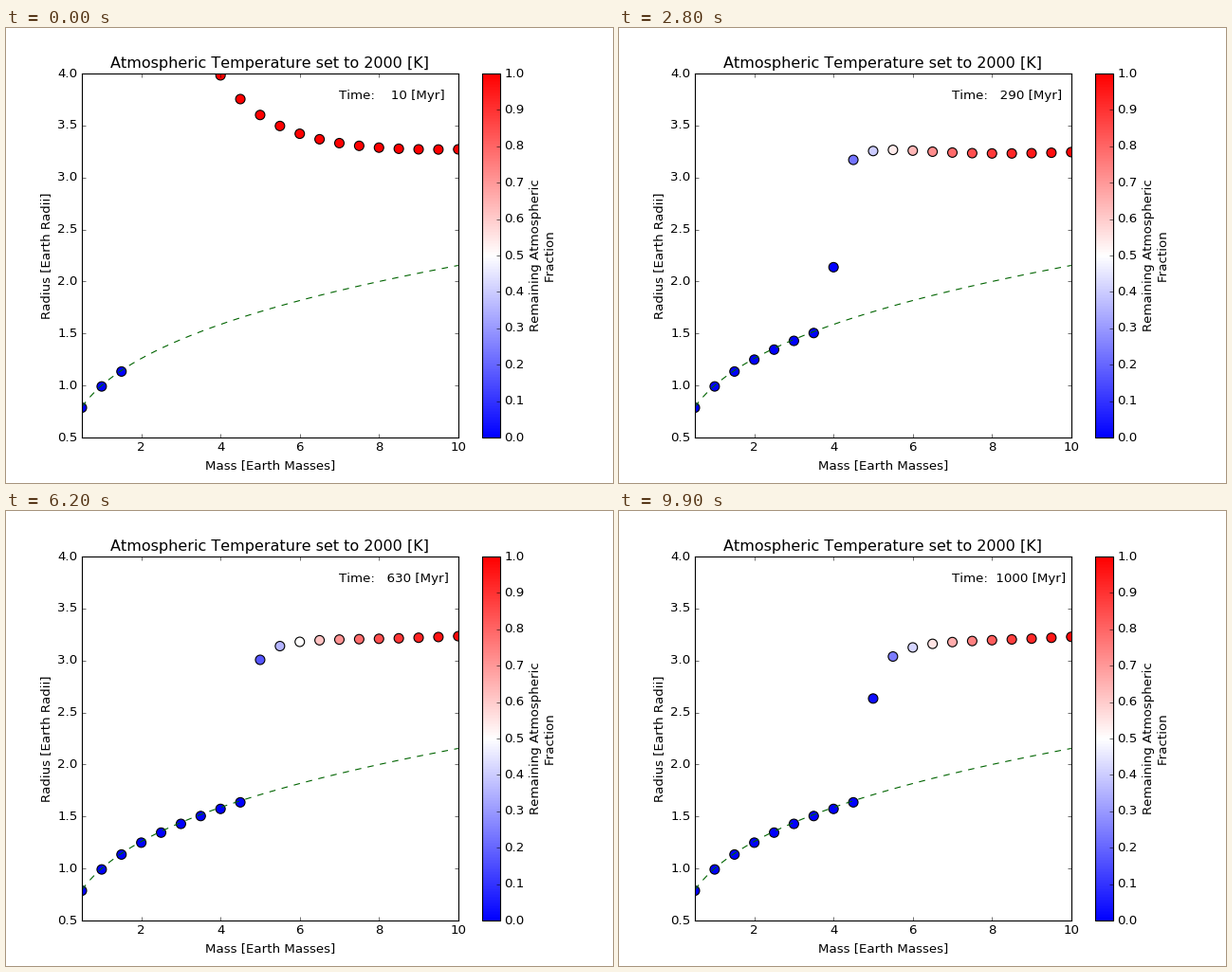
A matplotlib script for the animation above (10 s loop, 640x480 px).

```python
import numpy as np
import matplotlib.pyplot as plt
from matplotlib.animation import FuncAnimation

plt.style.use("classic")
plt.rcParams.update({
    "font.family": "DejaVu Sans",
    "text.kerning_factor": 6,  # letters set without kerning
    "figure.facecolor": "white",
    "savefig.dpi": "figure",
})

FRAMES = 100
STEP_MYR = 10
SATURATION = 100      # Myr during which the stellar flux stays constant
RADIUS_POWER = 0.187  # envelope size ~ fraction ** RADIUS_POWER

masses = np.arange(0.5, 10.1, 0.5)
core = 0.991 * np.cbrt(masses)

# The lightest planets are bare rock from the start.
has_air = masses > 1.5
m = masses[has_air]
lightness = np.exp(-2.3 * (m - 4))
size = 0.5725 + 4.876 / (m - 1.345)
loss = 0.333 * np.exp(-0.45 * (m - 5)) - 0.03
early_loss = 0.0756 * lightness
cooling = 0.011 + 0.04 * lightness


def dose(t):
    """Flux received since the start: steady at first, then falling as 1/t."""
    steady = (min(t, SATURATION) - STEP_MYR) / SATURATION
    return steady + np.log(max(t, SATURATION) / SATURATION)


def state(t):
    """Radius and remaining atmospheric fraction of every planet."""
    d = dose(t)
    lost = d * (loss + early_loss * max(2.181 - d, 0))
    left = np.clip(1 - lost, 0, 1)
    fraction = np.zeros_like(masses)
    fraction[has_air] = left
    radius = core.copy()
    radius[has_air] += size * (1 - cooling * d) * left**RADIUS_POWER
    return radius, fraction


fig, ax = plt.subplots(figsize=(8, 6), dpi=80)
radius, fraction = state(STEP_MYR)
dots = ax.scatter(masses, radius, c=fraction, s=80, cmap="bwr",
                  vmin=0, vmax=1, edgecolors="k", linewidths=1)
curve = np.linspace(0.5, 10, 200)
ax.plot(curve, np.cbrt(curve), "--", color="darkgreen", lw=1)
clock = ax.text(7, 3.75, "")

ax.set_xlim(0.5, 10)
ax.set_ylim(0.5, 4)
ax.set_xticks(range(2, 11, 2))
ax.set_yticks(np.arange(0.5, 4.1, 0.5))
ax.set_xlabel("Mass [Earth Masses]")
ax.set_ylabel("Radius [Earth Radii]")
ax.set_title("Atmospheric Temperature set to 2000 [K]")

bar = fig.colorbar(dots, ax=ax, ticks=np.linspace(0, 1, 11))
bar.set_label("Remaining Atmospheric\nFraction")


def draw(i):
    t = STEP_MYR * (i + 1)
    radius, fraction = state(t)
    dots.set_offsets(np.column_stack([masses, radius]))
    dots.set_array(fraction)
    clock.set_text(f"Time: {t:5d} [Myr]")
    return dots, clock


anim = FuncAnimation(fig, draw, frames=FRAMES, interval=100, repeat=True)
plt.show()
```
